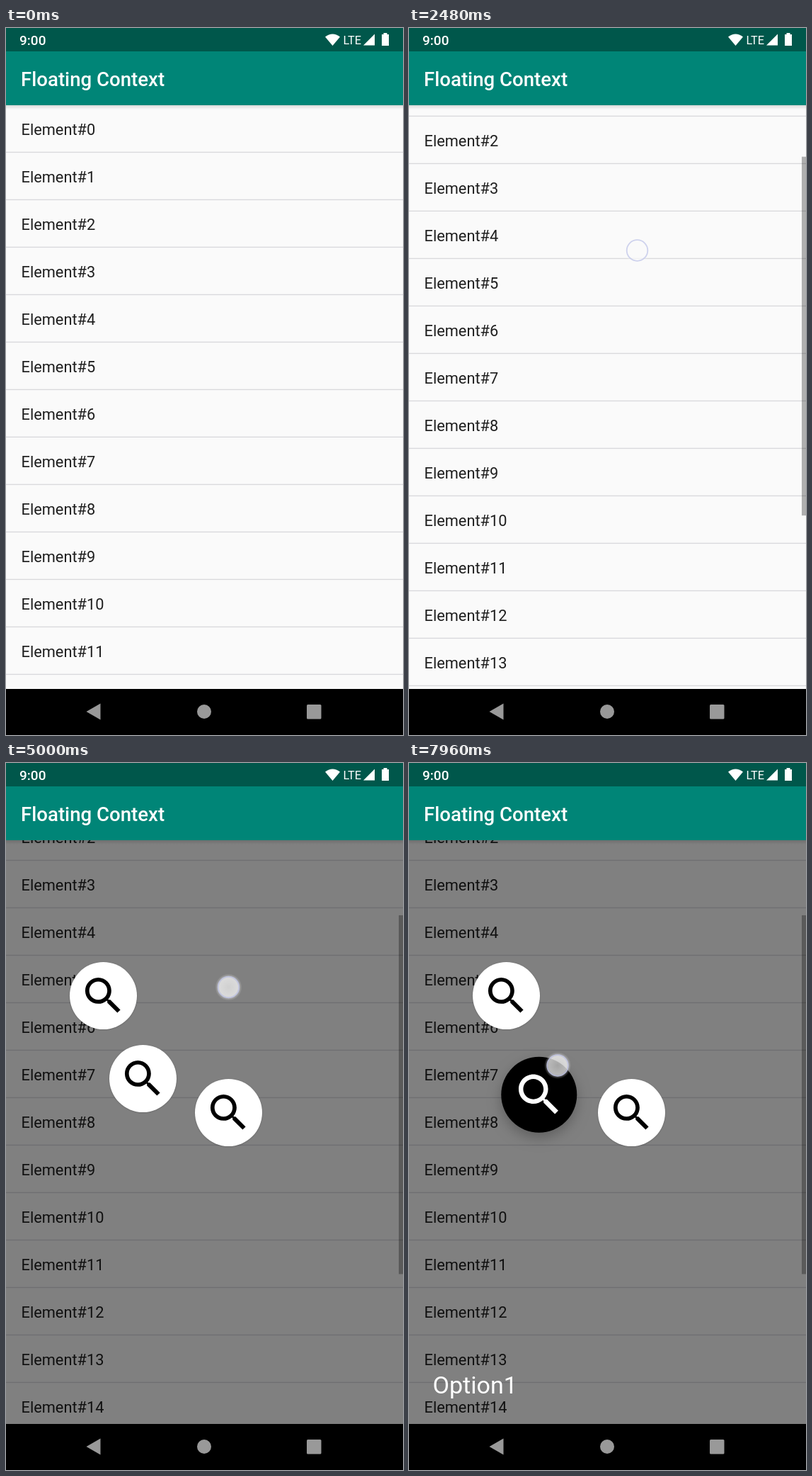
Recreate the animation shown at these times as an HTML page with a canvas. Size 561 by 998 pixels, loop 8000 ms.

```html
<!DOCTYPE html>
<html lang="en">
<head>
<meta charset="utf-8">
<title>Floating Context</title>
<style>
  html, body { margin: 0; width: 100%; height: 100%; overflow: hidden; background: #000; }
  canvas { display: block; width: 561px; height: 998px; }
</style>
</head>
<body>
<canvas id="stage"></canvas>
<script>
const W = 561, H = 998, LOOP = 8000, STEP = 40;
const LIST_TOP = 109, LIST_BOTTOM = 933, ROW = 67;
const canvas = document.getElementById('stage');
const ctx = canvas.getContext('2d');
const dpr = window.devicePixelRatio || 1;
canvas.width = W * dpr;
canvas.height = H * dpr;

const searchIcon = new Path2D('M15.5 14h-.79l-.28-.27C15.41 12.59 16 11.11 16 9.5 16 5.91 13.09 3 9.5 3S3 5.91 3 9.5 5.91 16 9.5 16c1.61 0 3.09-.59 4.23-1.57l.27.28v.79l5 4.99L20.49 19l-4.99-5zM9.5 14C7.01 14 5 11.99 5 9.5S7.01 5 9.5 5 14 7.01 14 9.5 11.99 14 9.5 14z');

// Touch paths as [time, x, y]; the finger is down from the first to the last key.
const swipe = [[2040, 288, 446], [2080, 289, 436], [2120, 293, 420.5], [2480, 322.5, 314], [2520, 325, 302]];
const hold = [[3880, 314.5, 316.5], [5000, 314.5, 316.5], [5900, 308, 482], [6160, 308, 482],
  [6240, 301, 471], [6960, 248, 441], [7240, 226, 439], [7480, 226, 439],
  [7760, 215, 429], [7920, 215, 429], [7960, 210, 427], [8000, 210, 427]];
const scrollKeys = [[2080, 0], [2120, 9.5], [2480, 118]];

const ORIGIN = { x: 314.5, y: 316.5 };
const NEVER = 2 * LOOP;
const options = [
  { x: 314.5, y: 493.5, on: 5720, off: 6480 },
  { x: 193.5, y: 445.5, on: 7040, off: NEVER },
  { x: 137.5, y: 328.5, on: NEVER, off: NEVER }
];

const clamp = v => Math.min(1, Math.max(0, v));
const progress = (t, from, to) => clamp((t - from) / (to - from));
const mix = (a, b, k) => a + (b - a) * k;
const easeOut = k => 1 - (1 - k) ** 3;

function along(keys, t) {
  let i = 0;
  while (i < keys.length - 2 && t >= keys[i + 1][0]) i++;
  const [a, b] = [keys[i], keys[i + 1]];
  const k = progress(t, a[0], b[0]);
  return a.slice(1).map((v, n) => mix(v, b[n + 1], k));
}

function rect(x, y, w, h, color) {
  ctx.fillStyle = color;
  ctx.fillRect(x, y, w, h);
}

function disc(x, y, r, color) {
  ctx.fillStyle = color;
  ctx.beginPath();
  ctx.arc(x, y, r, 0, Math.PI * 2);
  ctx.fill();
}

function polygon(points, color) {
  ctx.fillStyle = color;
  ctx.beginPath();
  points.forEach(([x, y]) => ctx.lineTo(x, y));
  ctx.fill();
}

function text(str, x, y, size, color, weight = 400) {
  ctx.font = `${weight} ${size}px Roboto, sans-serif`;
  ctx.fillStyle = color;
  ctx.fillText(str, x, y);
}

function scrollAt(t) {
  return t < 2480 ? along(scrollKeys, t)[0] : mix(118, 172, easeOut(progress(t, 2480, 3040)));
}

function scrollbarAlpha(t) {
  if (t < 2080) return 0;
  return t < 3880 ? 1 - progress(t, 3280, 3560) : 1;
}

function drawRipple(t, scroll) {
  if (t < 3960 || t >= 4640) return;
  const top = LIST_TOP + 5 * ROW - scroll;
  const fade = 1 - progress(t, 4440, 4640);
  ctx.save();
  ctx.beginPath();
  ctx.rect(0, top, W, ROW - 1.3);
  ctx.clip();
  rect(0, top, W, ROW, `rgba(0,0,0,${0.06 * fade})`);
  disc(ORIGIN.x, ORIGIN.y, 330 * easeOut(progress(t, 3960, 4240)), `rgba(0,0,0,${0.06 * fade})`);
  ctx.restore();
}

function drawList(t) {
  const scroll = scrollAt(t);
  ctx.save();
  ctx.beginPath();
  ctx.rect(0, LIST_TOP, W, LIST_BOTTOM - LIST_TOP);
  ctx.clip();
  rect(0, LIST_TOP, W, LIST_BOTTOM - LIST_TOP, '#fafafa');
  drawRipple(t, scroll);
  for (let i = 0; i < 18; i++) {
    const y = LIST_TOP + i * ROW - scroll;
    text('Element#' + i, 21.5, y + 41.5, 21.8, '#1f1f1f');
    rect(0, y + ROW - 1.3, W, 1.4, '#d9d9dc');
  }
  rect(555, LIST_TOP + 0.616 * scroll, 6, 506.5, `rgba(0,0,0,${0.3 * scrollbarAlpha(t)})`);
  const shadow = ctx.createLinearGradient(0, LIST_TOP, 0, LIST_TOP + 6);
  shadow.addColorStop(0, 'rgba(0,0,0,.13)');
  shadow.addColorStop(1, 'rgba(0,0,0,0)');
  rect(0, LIST_TOP, W, 6, shadow);
  ctx.restore();
}

// A selected button is pushed away from the first touch and grows from its top left corner.
function drawOption({ x, y, on, off }, t) {
  const selected = t >= on && t < off;
  const k = easeOut(progress(t, on, on + 200)) * (1 - easeOut(progress(t, off, off + 200)));
  const dx = x - ORIGIN.x, dy = y - ORIGIN.y, distance = Math.hypot(dx, dy);
  const size = mix(95, 107, k);
  const cx = x - 47.5 + dx / distance * 23 * k + size / 2;
  const cy = y - 47.5 + dy / distance * 23 * k + size / 2;
  ctx.save();
  ctx.shadowColor = 'rgba(0,0,0,.25)';
  ctx.shadowBlur = mix(2, 18, k) * dpr;
  ctx.shadowOffsetY = mix(0.5, 7, k) * dpr;
  disc(cx, cy, size / 2, selected ? '#000' : '#fff');
  ctx.restore();
  ctx.save();
  ctx.translate(cx, cy);
  ctx.scale(size / 33.45, size / 33.45);
  ctx.translate(-12, -12);
  ctx.fillStyle = selected ? '#fff' : '#000';
  ctx.fill(searchIcon);
  ctx.restore();
}

function drawMenu(t) {
  const shown = progress(t, 4440, 4640);
  if (!shown) return;
  rect(0, LIST_TOP, W, LIST_BOTTOM - LIST_TOP, `rgba(0,0,0,${0.49 * shown})`);
  ctx.globalAlpha = shown;
  options.forEach(option => drawOption(option, t));
  const active = options.findIndex(({ on, off }) => t >= on && t < off);
  if (active >= 0) text('Option' + active, 33.5, 889.5, 34.1, '#fff');
  ctx.globalAlpha = 1;
}

function drawTouch(keys, t) {
  if (t < keys[0][0] || t >= keys[keys.length - 1][0]) return;
  const [x, y] = along(keys, t);
  const glow = ctx.createRadialGradient(x, y, 0, x, y, 19);
  glow.addColorStop(0, 'rgba(250,250,250,.66)');
  glow.addColorStop(0.7, 'rgba(250,250,250,.74)');
  glow.addColorStop(0.82, 'rgba(250,250,250,.3)');
  glow.addColorStop(1, 'rgba(250,250,250,0)');
  disc(x, y, 19, glow);
  ctx.strokeStyle = 'rgba(196,200,234,.8)';
  ctx.lineWidth = 1.8;
  ctx.beginPath();
  ctx.arc(x, y, 14.8, 0, Math.PI * 2);
  ctx.stroke();
}

function drawBars() {
  rect(0, 0, W, 33, '#00574b');
  rect(0, 33, W, LIST_TOP - 33, '#008577');
  text('9:00', 19, 24, 19, '#fff', 500);
  text('LTE', 476.5, 22.5, 16.3, '#fff');
  text('Floating Context', 21, 81.5, 27.6, '#fff', 500);

  ctx.fillStyle = '#fff';
  ctx.beginPath();
  ctx.moveTo(461.5, 25);
  ctx.lineTo(451, 12.5);
  ctx.quadraticCurveTo(461.5, 4.5, 472, 12.5);
  ctx.fill();
  polygon([[505, 24.5], [521, 24.5], [521, 8.5]], '#fff');
  rect(531, 9, 10, 16, '#fff');
  rect(533.5, 7, 5, 2, '#fff');

  rect(0, LIST_BOTTOM, W, H - LIST_BOTTOM, '#000');
  polygon([[113.5, 965], [133.5, 953.5], [133.5, 976.5]], '#999');
  disc(280, 965, 10, '#999');
  ctx.beginPath();
  ctx.roundRect(425, 955, 20.5, 20.5, 1.5);
  ctx.fill();
}

function frame() {
  const t = Math.floor(performance.now() % LOOP / STEP) * STEP;
  ctx.setTransform(dpr, 0, 0, dpr, 0, 0);
  drawList(t);
  drawMenu(t);
  drawBars();
  drawTouch(swipe, t);
  drawTouch(hold, t);
  requestAnimationFrame(frame);
}
requestAnimationFrame(frame);
</script>
</body>
</html>
```
